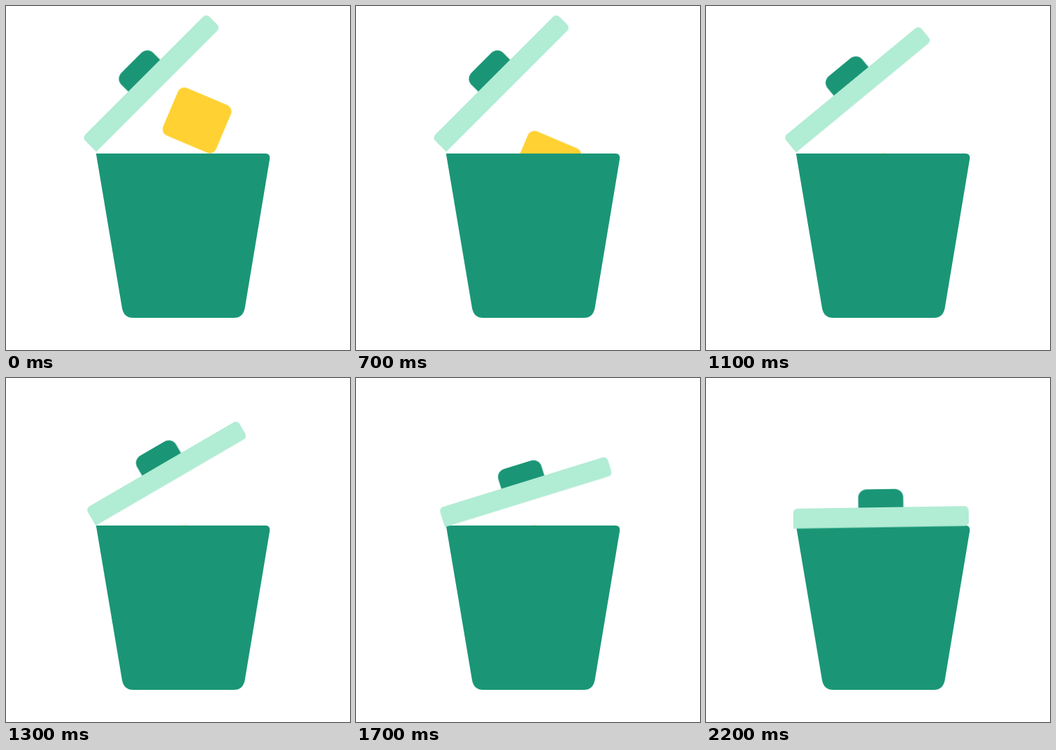
An HTML page that plays this animation: 492x492 px, repeating every 2.3 s.

```html
<!DOCTYPE html>
<html lang="en">
<head>
<meta charset="utf-8">
<title>Closing bin</title>
<style>
  html, body {
    margin: 0;
    width: 100%;
    height: 100%;
    overflow: hidden;
    background: #fff;
  }
  svg { display: block; width: 100vw; height: 100vh; }
  .bin, .handle { fill: #1a9676; }
  .bar { fill: #b1ecd4; }
  .block { fill: #ffd132; }

  /* Motion advances in 100 ms steps; the small negative delay keeps
     each step clear of its boundary. */
  .drop, .lid { animation: 2300ms -8ms infinite; }
  .drop { animation-name: drop; }
  .lid { animation-name: close; transform-origin: 118.6px 207px; }

  @keyframes drop {
    0%       { transform: translateY(0); animation-timing-function: steps(4); }
    17.3913% { transform: translateY(34px); animation-timing-function: steps(3); }
    30.4348% { transform: translateY(62px); animation-timing-function: steps(3); }
    43.4783%, 100% { transform: translateY(94px); }
  }
  @keyframes close {
    0%, 43.4783% { transform: rotate(-45deg); animation-timing-function: step-end; }
    47.8261% { transform: rotate(-39.5deg); animation-timing-function: step-end; }
    52.1739% { transform: rotate(-33.7deg); animation-timing-function: step-end; }
    56.5217% { transform: rotate(-30.2deg); animation-timing-function: steps(4); }
    73.913%  { transform: rotate(-17.2deg); animation-timing-function: step-end; }
    78.2609% { transform: rotate(-11.3deg); animation-timing-function: steps(4); }
    95.6522%, 100% { transform: rotate(-0.87deg); }
  }
</style>
</head>
<body>
<svg viewBox="0 0 492 492">
  <g class="drop">
    <rect class="block" x="232" y="126.6" width="82.4" height="74" rx="10"
          transform="rotate(23 273.2 163.6)"/>
  </g>
  <path class="bin" d="M128.8 211H371.5Q377.5 211 377.3 218L341.6 432Q339 446 326 446H182Q168.500 446 166 432Z"/>
  <g class="lid">
    <rect class="handle" x="218.2" y="161" width="64.4" height="44" rx="12"/>
    <path class="bar" d="M124.9 215.4V192.900a6 6 0 0 1 6-6H369.900a6 6 0 0 1 6 6V209.400a6 6 0 0 1-6 6Z"/>
  </g>
</svg>
</body>
</html>
```
